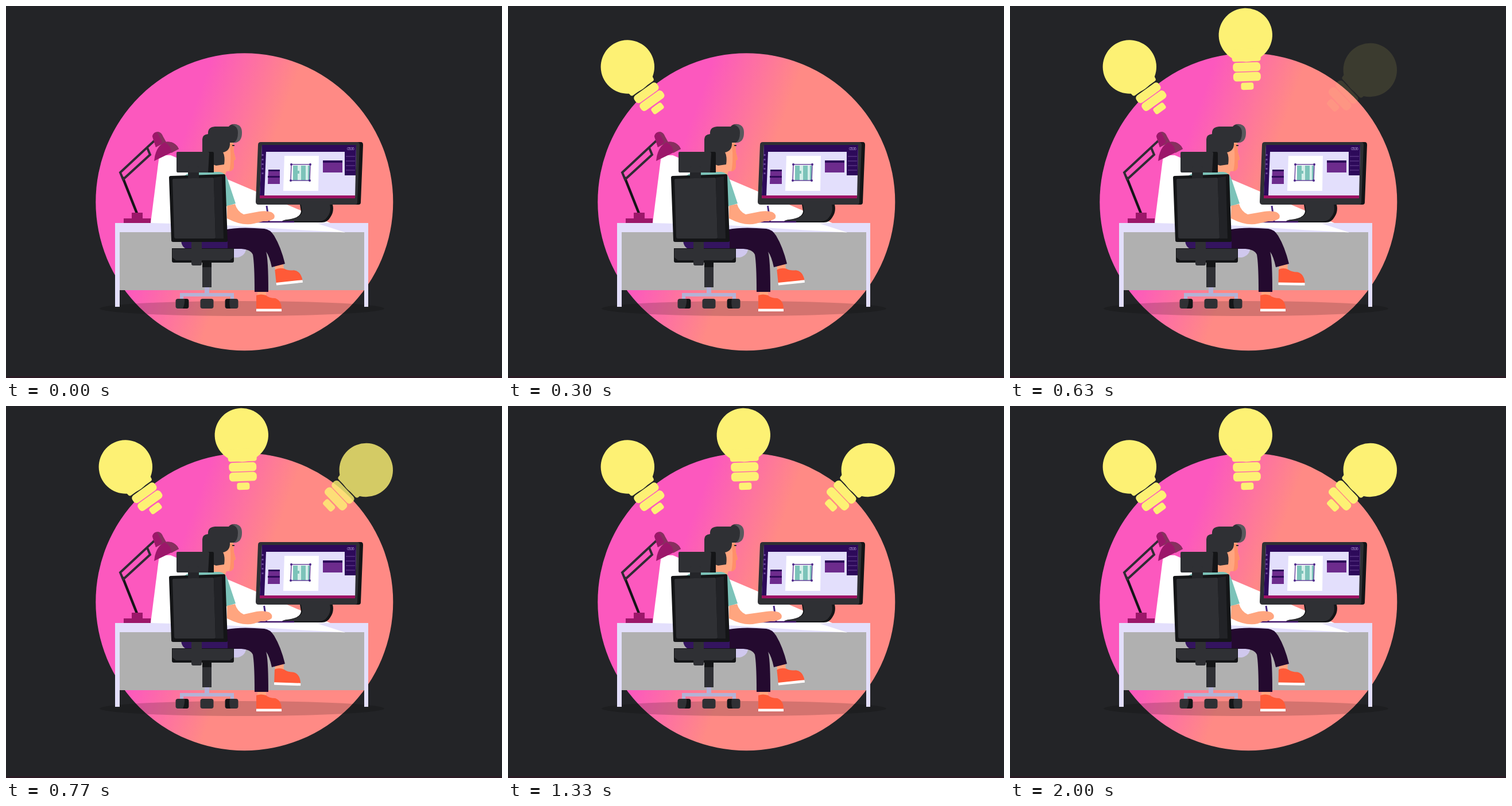
These frames come from a looping animation (864 by 648 pixels, 2.03 s). An HTML page:

```html
<!DOCTYPE html>
<html lang="en">
<head>
<meta charset="utf-8">
<title>Designer with ideas</title>
<style>
html, body { margin: 0; width: 100%; height: 100%; overflow: hidden; background: #232427; }
svg { display: block; width: 100vw; height: 100vh; }
.ink { fill: #2f3034; }
.black { fill: #141517; }
.lilac { fill: #e3dffc; }
.skin { fill: #ffa57f; }
.plum { fill: #240a2f; }
.violet { fill: #2d0a5a; }
.berry { fill: #9c176a; }
.teal { fill: #7cc3b9; }
.shoe { fill: #ff5a38; }
.bulb { fill: #fdf174; }
text { font: 7px "Liberation Sans", Arial, sans-serif; fill: #a98fd0; }
</style>
</head>
<body>
<svg viewBox="0 0 864 648">
  <defs>
    <linearGradient id="glow" gradientUnits="userSpaceOnUse" x1="347" y1="122" x2="489" y2="173">
      <stop stop-color="#fc58be"/><stop offset="1" stop-color="#ff8a85"/>
    </linearGradient>
    <g id="bulb">
      <circle r="46.7"/>
      <path d="M-40 24Q-25 34-25 41Q-25 46-21 46H21Q25 46 25 41Q25 34 40 24Z"/>
      <rect x="-24" y="48" width="48" height="15.5" rx="6"/>
      <rect x="-24" y="65" width="48" height="15.5" rx="6"/>
      <rect x="-11" y="83" width="22" height="12.5" rx="4"/>
    </g>
    <g id="wheel">
      <rect x="-11.5" y="510" width="23" height="17" rx="4" class="ink"/>
    </g>
  </defs>

  <rect y="645" width="864" height="3" fill="#2b1b24"/>
  <circle cx="415.3" cy="341.3" r="259" fill="url(#glow)"/>
  <ellipse cx="411" cy="527" rx="248" ry="13" opacity=".17"/>

  <!-- lamp light and desk -->
  <path d="M267 260H287L565 378H252Z" fill="#fff"/>
  <rect x="197" y="393" width="428" height="102" fill="#b0b0b0"/>
  <path class="lilac" d="M190 378H631V524H624V394H198V524H190Z"/>
  <path d="M252 378H540L591 394.500L510 390L385 382Z" fill="#fff"/>

  <!-- lamp -->
  <path d="M203 298L228 361" fill="none" stroke="#151417" stroke-width="4.500"/>
  <path d="M258 235L199 290L204 302L251 259L246 247" fill="none" stroke="#2f2b33" stroke-width="4"/>
  <path class="berry" d="M205 378V370H219V360H238V370H252V378Z"/>
  <path d="M255 227Q257 219 265 219Q271 220 274 228L279 237L261 246Z" fill="#87305f"/>
  <path class="berry" d="M255 227Q257 219 263 220L272 237L261 246ZM258 270Q260 246 276 237Q294 234 301 249Z"/>
  <path d="M276 237Q294 234 301 249L288 256Q288 243 276 237Z" fill="#87305f"/>

  <!-- monitor -->
  <path class="black" d="M512 346H569Q572 358 565 368Q560 377 550 377H480Q480 373 490 372Q512 370 514 358Z"/>
  <path class="ink" d="M514 346H564Q567 358 560 367Q555 375 545 375H482Q484 372 494 372Q514 369 516 358Z"/>
  <path class="black" d="M446 237H618Q622 237 622 242L618 342Q618 346 614 346H470Z"/>
  <path class="ink" d="M444 237H611Q616 237 616 242L612 342Q612 346 608 346H440Q435 346 435 341L439 242Q439 237 444 237Z"/>
  <path class="lilac" d="M446 242H610L608 335H442Z"/>
  <path class="violet" d="M446 242H610L609 295H590V254H453L450 330H442Z"/>
  <path d="M442 330H608V335H442Z" fill="#9d1264"/>
  <path d="M447 258V298" stroke="#6a4798" stroke-width="3" stroke-dasharray="3 5"/>
  <path d="M592 262H608M592 270H608M592 278H608M592 286H608" stroke="#6b4696"/>
  <text x="594" y="251" textLength="13">05:36</text>
  <path d="M485 261H545L544 322H483Z" fill="#fff"/>
  <path d="M500 278H529V304H499Z" fill="#d5efea"/>
  <path class="teal" d="M500 278H508V304H500ZM514 278H522V304H514ZM505 287H511V292H505ZM526 278H529V304H526Z"/>
  <path d="M497 276H530L529 304H496Z" fill="none" stroke="#66449b" stroke-width="1.500"/>
  <path d="M497 276h0M530 276h0M529 304h0M496 304h0" stroke="#4b2688" stroke-width="4" stroke-linecap="round"/>
  <path d="M457 285H477V310H456ZM552 269H586V290H552Z" fill="#6d2b8d"/>
  <path class="violet" d="M457 285H477V288H457ZM456 296H477V299H456ZM552 269H586V273H552Z"/>

  <!-- head and shirt -->
  <path class="skin" d="M372 237H396L397 255L400 266Q400 268 397 269V280Q396 288 384 288L382 294H362V255Z"/>
  <path d="M390 240H396L397 255L400 266Q400 268 397 269V280Q396 287 389 288Q393 270 390 240Z" fill="#ff9068"/>
  <path d="M394 243H398" stroke="#2f3034" stroke-width="2"/>
  <path class="ink" d="M342 270V232Q342 224 352 223Q351 211 364 210H388Q392 205 400 206Q410 208 410 221Q410 238 397 238H390Q391 252 378 255Q382 262 380 276L366 278Z"/>
  <path d="M393 207Q411 203 411 221Q411 238 397 238Q404 234 404 221Q404 209 393 207Z" fill="#59595d"/>
  <path class="teal" d="M308 300Q313 289 335 289H372Q382 290 386 302L400 344L384 349L370 330Z"/>

  <!-- drawing arm -->
  <path d="M432 376H502" stroke="#41166c" stroke-width="2.500"/>
  <path id="pen" d="M454 348L458 375" stroke="#4a2a86" stroke-width="3"/>
  <path id="arm" class="skin"/>

  <!-- legs -->
  <path d="M388 422H418Q418 434 404 438H388Z" fill="#d0c8ee"/>
  <path class="skin" d="M438 496H453V506H438Z"/>
  <g id="foot">
    <path class="skin" d="M468 448L483 446L484 461H469Z"/>
    <path class="shoe" d="M468 459Q476 455 485 459Q490 463 501 463Q513 466 514 482H468Z"/>
    <path d="M468 481.500H514V486H468Z" fill="#fff"/>
  </g>
  <path class="shoe" d="M436 504Q444 501 453 504Q458 509 469 509Q480 513 480 528H436Z"/>
  <path d="M436 527.500H480V532H436Z" fill="#fff"/>
  <path class="plum" d="M380 390Q405 384 450 388Q460 389 467 400Q479 420 486 449L463 455Q459 436 453 428Q457 440 457 498H433Q433 450 430 433Q426 424 410 423H380Z"/>

  <!-- chair -->
  <path d="M305 409H386V423H314Q306 420 305 409Z" fill="#34145f"/>
  <path d="M346 488H354V500H397V510H391V506H309V510H303V500H346Z" fill="#b3b2d6"/>
  <use href="#wheel" x="307"/><use href="#wheel" x="350"/><use href="#wheel" x="393"/>
  <path class="black" d="M311 510H314Q318 510 318 514V523Q318 527 314 527H308Q312 518 311 510ZM386 510Q382 510 382 514V523Q382 527 386 527H391Q388 518 390 510Z"/>
  <path class="ink" d="M342 446H358V490H342Z"/>
  <path class="black" d="M342 446H358V455H342Z"/>
  <path class="black" d="M289 422H397V444Q397 447 394 447H292Q289 447 289 444Z"/>
  <path class="ink" d="M290 423H396V438L390 443H296L290 438Z"/>
  <path class="black" d="M299 254H360Q362 254 362 257V290H299Z"/>
  <path class="ink" d="M299 254H352Q354 254 354 257L352 290H299Q297 290 297 287V256Q297 254 299 254Z"/>
  <path class="black" d="M287 296L380 293Q382 293 382 296L386 409Q386 411 383 411H291Q288 411 288 408L284 299Q284 296 287 296Z"/>
  <path class="ink" d="M291 301L360 299Q362 299 362 302L365 403Q365 405 362 405H296Q293 405 293 402L290 303Z"/>
  <path d="M362 299L376 297L379 405H365Z" fill="#222327"/>
  <path class="ink" d="M317 282Q317 279 321 279H332Q336 279 336 282V300H317Z"/>
  <path d="M317 290H336V300H317Z" fill="#242529"/>
  <path class="ink" d="M323 411H341V449Q341 452 338 452H326Q323 452 323 449Z"/>

  <!-- ideas -->
  <g class="bulb">
    <use href="#bulb" transform="translate(208.300 106) rotate(-35.800)"/>
    <use href="#bulb" transform="translate(410.300 50.500) rotate(-2)"/>
    <use href="#bulb" transform="translate(627.300 111.500) rotate(46.400)"/>
  </g>
</svg>
<script>
const LOOP = 2030, FADE = 270;
const starts = [30, 300, 575];
// [time, value] pairs
const reach = [[0, 0], [170, 0], [430, -3], [630, 2], [900, -10], [1330, 9], [2000, -8]];
const tilt = [[0, -6], [250, -6], [430, -5.5], [630, 1], [900, 2.5], [1330, -6], [2000, 1]];

const find = id => document.getElementById(id);
const bulbs = document.querySelectorAll('.bulb use');
const pen = find('pen'), arm = find('arm'), foot = find('foot');

const ease = p => {
  p = Math.min(1, Math.max(0, p));
  return p * p * (3 - 2 * p);
};

function track(keys, t) {
  const i = keys.findIndex(k => k[0] > t);
  if (i < 0) return keys[keys.length - 1][1];
  const [t0, a] = keys[i - 1], [t1, b] = keys[i];
  return a + (b - a) * ease((t - t0) / (t1 - t0));
}

function armPath(d) {
  const x = n => n + d;
  return `M385 348L399 345Q403 358 414 363L${x(441)} 358Q${x(453)} 356 ${x(462)} 359` +
    `Q${x(470)} 363 ${x(467)} 370Q${x(461)} 375 ${x(448)} 375L432 379Q412 384 385 370Z`;
}

function draw(now) {
  const t = now % LOOP;
  bulbs.forEach((b, i) => b.setAttribute('opacity', ease((t - starts[i]) / FADE)));
  const d = track(reach, t);
  pen.setAttribute('transform', `translate(${d})`);
  arm.setAttribute('d', armPath(d));
  foot.setAttribute('transform', `rotate(${track(tilt, t)} 474 456)`);
  requestAnimationFrame(draw);
}
draw(0);
</script>
</body>
</html>
```
